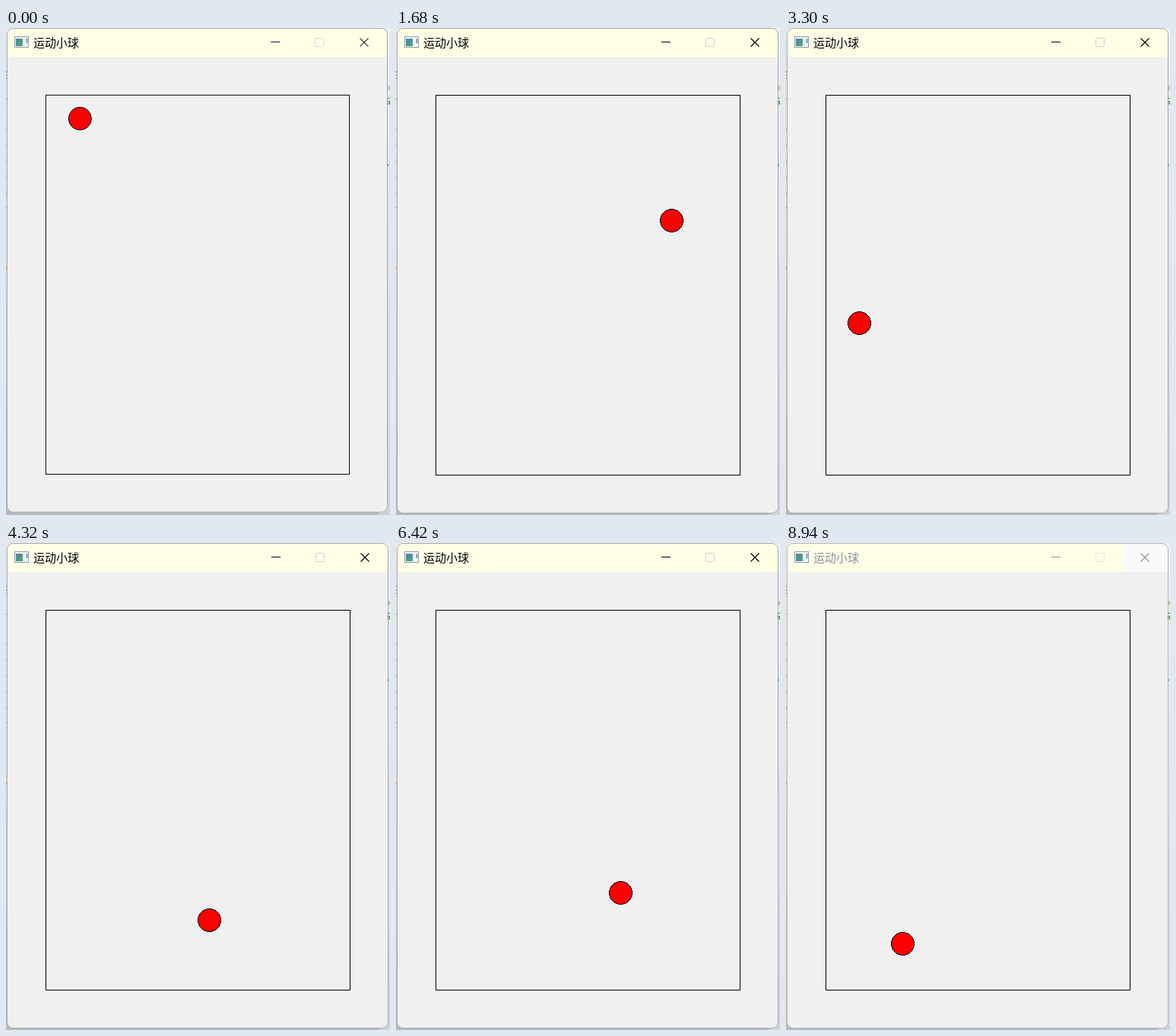
Animation, 505 px wide and 641 px high, one loop 9000 ms. Source, as an HTML page:

```html
<!DOCTYPE html>
<html lang="zh">
<head>
<meta charset="utf-8">
<style>
  html, body { margin: 0; width: 100%; height: 100%; overflow: hidden; }
  svg { display: block; width: 505px; height: 641px; }
  #title { font: 15px "Noto Sans CJK SC", "Noto Sans CJK", sans-serif; }
</style>
</head>
<body>
<svg viewBox="0 0 505 641">
  <defs>
    <linearGradient id="shade" x2="0" y2="1">
      <stop offset="0" stop-color="#ececec"/>
      <stop offset=".45" stop-color="#dcdede"/>
      <stop offset="1" stop-color="#b4b9bb"/>
    </linearGradient>
    <linearGradient id="shadeRight" x2="0" y2="1">
      <stop offset="0" stop-color="#f0f0f0"/>
      <stop offset="1" stop-color="#d2d2d2"/>
    </linearGradient>
    <linearGradient id="pane" x2="1" y2="1">
      <stop offset="0" stop-color="#4b7fa6"/>
      <stop offset="1" stop-color="#56a579"/>
    </linearGradient>
    <clipPath id="frame"><rect x="1.5" y=".5" width="501" height="638" rx="8"/></clipPath>
  </defs>

  <rect width="505" height="641" fill="url(#shade)"/>
  <rect x="490" width="15" height="641" fill="url(#shadeRight)"/>
  <path id="marks" stroke="#777" stroke-width="1"/>
  <path d="M0 57.5h2M0 62h2M0 66.5h2" stroke="#555"/>
  <path d="M0 316.5h2" stroke="#c89b36" stroke-width="2"/>

  <g id="window">
    <g clip-path="url(#frame)">
      <rect width="505" height="641" fill="#f0f0f0"/>
      <rect width="505" height="38" fill="#ffffe6"/>
      <rect id="hover" x="443" width="60" height="38" fill="#f9f9f9"/>
    </g>
    <rect id="edge" x="1.5" y=".5" width="501" height="638" rx="8" fill="none"/>
    <g id="icon">
      <rect x="11.5" y="11.5" width="18" height="14" fill="#f6f8fa" stroke="#8e9aa8"/>
      <rect x="13" y="14" width="9" height="10" fill="url(#pane)"/>
      <path d="M23.5 14v10" stroke="#cfd5dc"/>
      <path d="M27.5 14v6" stroke="#8092a8" stroke-width="2"/>
    </g>
    <text id="title" x="36" y="25">运动小球</text>
    <g fill="none">
      <path id="controls" d="M349 18.5h12M466.5 13.5l11 11m0 -11l-11 11" stroke-width="1.2"/>
      <rect id="maximize" x="407.5" y="13.5" width="11" height="11" rx="1"/>
      <rect x="52.5" y="88.5" width="400" height="500" stroke="#000"/>
    </g>
    <circle id="ball" r="15" fill="#f00" stroke="#000"/>
  </g>

  <path d="M502.5 76l2.5 3-2.5 3" fill="none" stroke="#8a8a30"/>
  <path d="M502 92.5h3M501.5 96.5h3.5M504.5 96v5M502 101l1.5-3" fill="none" stroke="#2f9a3c"/>
  <path d="M502 180.5h1.5" stroke="#358a70" stroke-width="2"/>
</svg>
<script>
const STEP = 60, STEPS = 150;
const HOVER_AT = 7440, INACTIVE_AT = 8820;

// Horizontal path between the walls: [step, x]; each wall costs some speed.
const track = [[0, 97], [22.1, 436.5], [32, 312], [51.6, 68.5], [52.2, 68.5],
  [80, 347.5], [88.9, 436.5], [89.5, 436.5], [128, 126.5], [135, 68.5],
  [135.8, 68.5], [149, 153.5]];

// Vertical path: apex [step, y] of each parabola; arcs meet at the bounces.
const HALF_GRAVITY = 1.17, FLOOR = 572.5;
const apexes = [[-6.46, 70.7], [30.75, 244.5], [60.8, 349.5], [85.4, 416.5],
  [106.2, 459.5], [123.5, 491], [138.5, 507.5], [151.5, 520]];

const el = id => document.getElementById(id);
const set = (id, attrs) => {
  for (const name in attrs) el(id).setAttribute(name, attrs[name]);
};
const snap = v => Math.floor(v) + 0.5;

function ballX(s) {
  const i = Math.max(1, track.findIndex(([end]) => s <= end));
  const [s0, x0] = track[i - 1], [s1, x1] = track[i];
  return x0 + (x1 - x0) * (s - s0) / (s1 - s0);
}

function ballY(s) {
  return Math.min(FLOOR, ...apexes.map(([top, y]) => y + HALF_GRAVITY * (s - top) ** 2));
}

function draw(now) {
  const s = Math.floor(now / STEP) % STEPS, time = s * STEP;
  const first = s === 0, inactive = time >= INACTIVE_AT;
  set('window', { transform: first ? 'scale(.998)' : '' });
  set('ball', {
    cx: snap(ballX(s)), cy: snap(ballY(s)),
    'shape-rendering': first ? 'auto' : 'crispEdges'
  });
  set('hover', { visibility: time >= HOVER_AT ? 'visible' : 'hidden' });
  set('title', { fill: inactive ? '#9090a0' : '#000' });
  set('controls', { stroke: inactive ? '#92929a' : first ? '#383848' : '#000' });
  set('maximize', { stroke: inactive ? '#e4e4ec' : first ? '#cddcec' : '#cfcfd8' });
  set('edge', { stroke: inactive ? '#b8b8b8' : '#a8a8a8' });
  requestAnimationFrame(tick);
}

const start = performance.now();
const tick = () => draw(performance.now() - start);

set('marks', { d: [93, 133, 154, 175, 196, 217, 236].map(y => `M0 ${y + 0.5}h2`).join('') });
tick();
</script>
</body>
</html>
```
